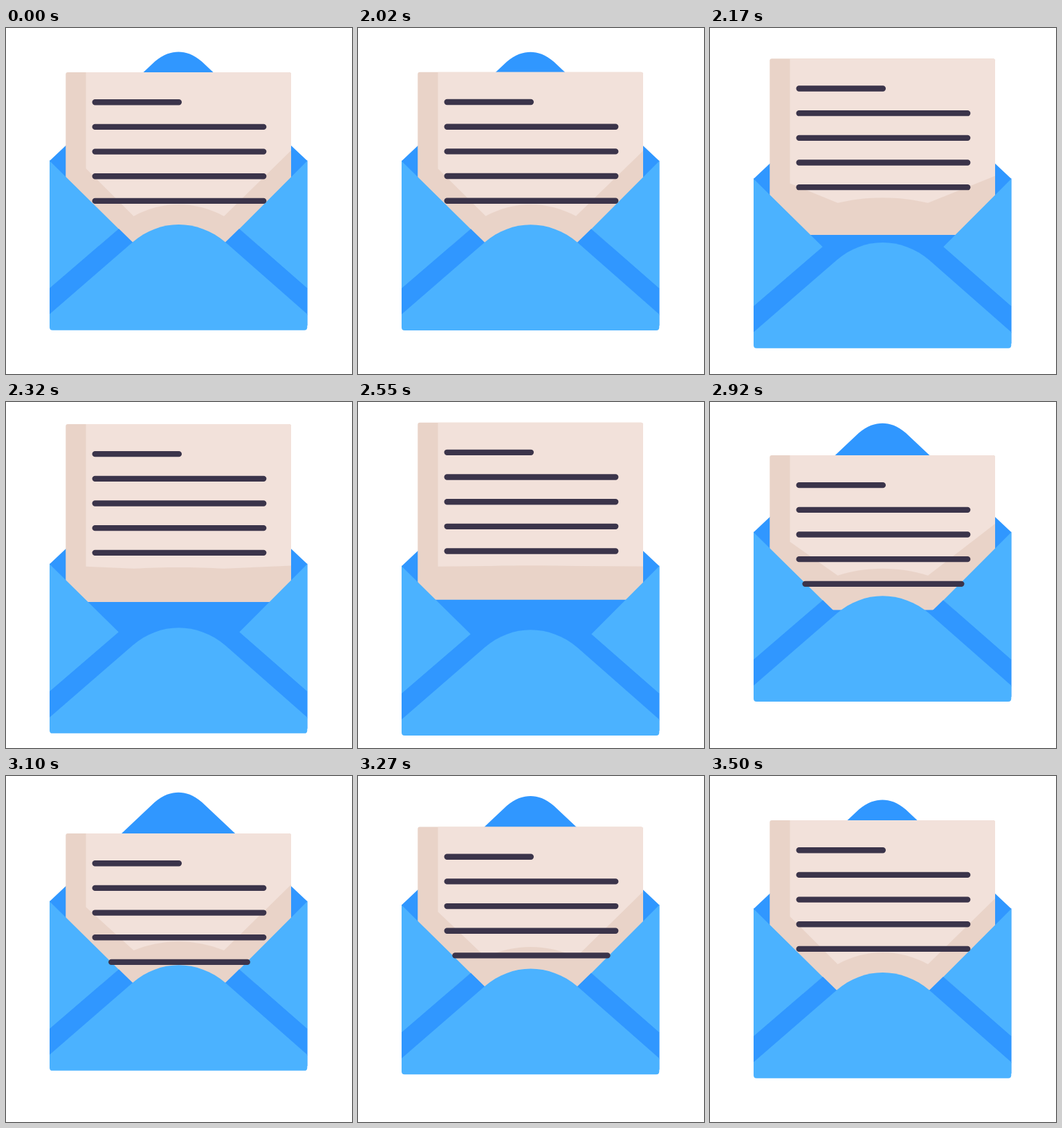
Write an HTML page that moves like this. It is 500 px wide and 500 px high and loops after 3520 ms.

```html
<!DOCTYPE html>
<html lang="en">
<head>
<meta charset="utf-8">
<title>Letter in an envelope</title>
<style>
  html, body { margin: 0; width: 100%; height: 100%; overflow: hidden; background: #fff; }
  svg { display: block; width: 100%; height: 100%; }
  .dark { fill: #3097ff; }
  .light { fill: #4bb2ff; }
  .ink { stroke: #3b344a; stroke-width: 8.4; stroke-linecap: round; }
</style>
</head>
<body>
<svg viewBox="0 0 500 500">
  <g class="dark" data-part="envelope">
    <path d="M63 192L198 64.5L215 48.5C227 38 239 34.5 249.3 34.5S271 38 283 48.5L300 64.5L435.5 192Z"/>
    <path d="M63 191.5H435.5V430H63Z"/>
  </g>
  <g data-part="letter">
    <path id="sheet" fill="#e9d3c8"/>
    <path id="face" fill="#f2e1da"/>
    <path class="ink" d="M128.7 107.2H249.8M128.7 142.9H372.2M128.7 178.6H372.2M128.7 214.2H372.2"/>
  </g>
  <g data-part="envelope">
    <path class="light" d="M63 192L163 290.5L63 376.5ZM435.3 192L337 290.5L435.3 376.5Z"/>
    <path class="dark" d="M163 290L184 310.5L63 415V376ZM337 290L316 310.5L435.3 415V376Z"/>
    <path class="light" d="M63 413.5L183 309.5C203 292.5 226 284 249.5 284S297 292.5 317 309.5L435.3 413.5V432.5Q435.3 436.7 431 436.7H67.3Q63 436.7 63 432.5Z"/>
  </g>
  <g data-part="letter">
    <path id="lastLine" class="ink"/>
  </g>
</svg>
<script>
const LOOP = 3520;
const parts = name => document.querySelectorAll(`[data-part=${name}]`);
const envelope = parts("envelope"), letter = parts("letter");
const [sheet, face, lastLine] = ["sheet", "face", "lastLine"].map(id => document.getElementById(id));

// Shape heights: left edge, corner, crest, right edge, sheet bottom
const poses = {
  rest: { env: 0, paper: 0, inset: 0, shape: [203, 272, 255, 177, 315] },
  open: { env: 46, paper: -35, inset: 0, shape: [276, 273, 272.5, 277, 321.5] },
  sunk: { env: -12, paper: 21, inset: 26, shape: [167, 229, 216.5, 134, 279] }
};

const clamp = u => Math.min(1, Math.max(0, u));
const mix = (a, b, u) => a + (b - a) * u;

// Cubic easing with control points (x1, 0) and (x2, 1)
const ease = (x1, x2) => u => {
  let lo = 0, hi = 1;
  for (let i = 0; i < 30; i++) {
    const s = (lo + hi) / 2, r = 1 - s;
    if (3 * r * r * s * x1 + 3 * r * s * s * x2 + s * s * s < u) lo = s;
    else hi = s;
  }
  return lo * lo * (3 - 2 * lo);
};

const lift = ease(0.333, 0.17), drop = ease(0.56, 0.79);
const bend = ease(0.25, 1), settle = ease(0.36, 0.667);
const smooth = ease(0.333, 0.667);

const steps = [
  { start: 2000, from: poses.rest, to: poses.open, move: lift, morph: lift, trim: lift },
  { start: 2500, from: poses.open, to: poses.sunk, move: drop, morph: bend,
    trim: u => smooth(clamp((u - 0.74) / 0.26)) },
  { start: 3000, from: poses.sunk, to: poses.rest, move: settle, morph: settle, trim: settle }
];

function place(group, y) {
  group.forEach(g => g.setAttribute("transform", `translate(0 ${y.toFixed(3)})`));
}

function draw(t) {
  const step = steps.filter(s => t >= s.start).pop() || steps[0];
  const u = clamp((t - step.start) / 500);
  const { from, to } = step;
  const move = u === 1 ? 1 : u && step.move(u);
  const morph = u === 1 ? 1 : u && step.morph(u);
  const trim = u === 1 ? 1 : u && step.trim(u);

  place(envelope, mix(from.env, to.env, move));
  place(letter, mix(from.paper, to.paper, move));

  const [left, corner, crest, right, bottom] = from.shape.map((v, i) => mix(v, to.shape[i], morph));
  const curve = mix(corner, crest, 0.65);
  sheet.setAttribute("d", `M86.3 ${bottom}V67Q86.3 64 89.3 64H409Q412 64 412 67V${bottom}Z`);
  face.setAttribute("d", `M115.5 64H409Q412 64 412 67V${right}L315 ${corner}` +
    `C295 ${curve} 272 ${crest} 249.5 ${crest}S204 ${curve} 184.5 ${corner}L115.5 ${left}Z`);

  const inset = mix(from.inset, to.inset, trim);
  lastLine.setAttribute("d", `M${128.7 + inset} 249.9H${372.2 - inset}`);
}

const origin = performance.now();
function tick() {
  draw((performance.now() - origin) % LOOP);
  requestAnimationFrame(tick);
}
draw(0);
requestAnimationFrame(tick);
</script>
</body>
</html>
```
